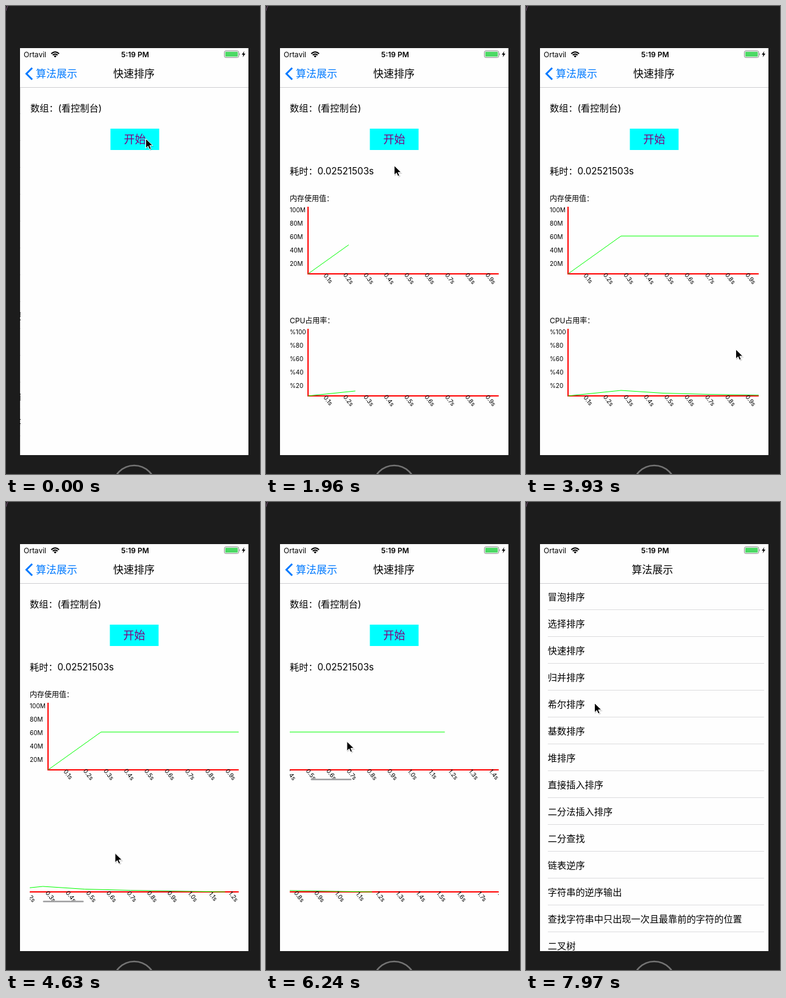
Animation of 417 by 767 pixels, one loop 8 s. Source, as an HTML page:

```html
<!DOCTYPE html>
<html lang="zh-CN">
<head>
<meta charset="utf-8">
<style>
  html, body { margin: 0; width: 100%; height: 100%; overflow: hidden; background: #1c1c1c; }
  svg { display: block; }
  text { font: 15.2px Inter, "Noto Sans CJK SC", "Noto Sans CJK", sans-serif; white-space: pre; }
  text.status, text.caption { font-size: 12px; }
  text.title { font-size: 17px; font-weight: 500; }
  text.tick { font-size: 10px; }
</style>
</head>
<body>
<svg id="stage" width="417" height="767" viewBox="0 0 417 767"></svg>
<script>
const LOOP = 8000;
const ROWS = ['冒泡排序', '选择排序', '快速排序', '归并排序', '希尔排序', '基数排序', '堆排序',
  '直接插入排序', '二分法插入排序', '二分查找', '链表逆序', '字符串的逆序输出',
  '查找字符串中只出现一次且最靠前的字符的位置', '二叉树'];

const text = (x, y, s, attrs = '') => `<text x="${x}" y="${y}" ${attrs}>${s}</text>`;
const rect = (x, y, w, h, fill, attrs = '') =>
  `<rect x="${x}" y="${y}" width="${w}" height="${h}" fill="${fill}" ${attrs}/>`;

function chart(id, top, caption, tickLabel, points) {
  let ticks = '';
  for (let i = 0; i < 5; i++)
    ticks += text(39, top + 28.5 + i * 22, tickLabel(100 - i * 20), 'class="tick"');
  for (let i = 1; i <= 50; i++) {
    const move = `translate(${102 + 33.35 * (i - 1)} ${top + 137.5}) rotate(52)`;
    ticks += text(0, 3.5, (i / 10).toFixed(1) + 's', `class="tick" text-anchor="middle" transform="${move}"`);
  }
  return `<svg x="39" y="${top}" width="343" height="148" viewBox="39 ${top} 343 148">
    <g id="${id}Body">
      ${text(39, top + 10.5, caption, 'class="caption"')}
      <path d="M69 ${top + 20}V${top + 130}H1795" fill="none" stroke="#f00" stroke-width="2"/>
      <path id="${id}Line" d="M${points}" pathLength="1" fill="none" stroke="#0f0"/>
      ${ticks}
    </g>
    ${rect(42, top + 144.5, 67, 2.5, '#a0a0a2', `id="${id}Bar" rx="1.25"`)}
  </svg>`;
}

const list = ROWS.map((name, i) =>
  text(38, 160.5 + 44 * i, name) + rect(38, 176 + 44 * i, 360, 1, '#dcdcde')).join('');

document.getElementById('stage').innerHTML = `
  <clipPath id="screen"><rect x="23" y="69" width="375" height="667"/></clipPath>
  ${rect(0, 0, 417, 767, '#1c1c1c')}
  <path d="M0 8Q1 3 3 0" fill="none" stroke="#6b4a6b" stroke-width="1.2"/>
  <circle cx="210.5" cy="788" r="35" fill="none" stroke="#747474" stroke-width="2.5"/>
  <g clip-path="url(#screen)">
    ${rect(23, 69, 375, 667, '#fefefe')}
    <g id="list">${list}${rect(23, 133, 375, 603, '#000', 'id="dim"')}</g>
    <g id="page">
      ${rect(23, 133, 375, 603, '#fefefe')}
      ${text(39, 172.5, '数组：(看控制台)')}
      ${rect(170.5, 201, 80, 35, '#0ff')}
      ${text(210.5, 225, '开始', 'text-anchor="middle" style="font-size:18px" fill="#800080"')}
      <g id="result">
        ${text(39, 275.5, '耗时：0.02521503s')}
        ${chart('mem', 309, '内存使用值：', v => v + 'M', '69 439L156 377H455')}
        ${chart('cpu', 509, 'CPU占用率：', v => '%' + v, '69 639L156 630L225 634.5L300 636.5L455 639')}
      </g>
    </g>
    ${rect(23, 69, 375, 64, '#fefefe')}
    ${rect(23, 133, 375, 1, '#cfcfd1')}
    <g id="back" fill="#007aff">
      <path d="M43 101.5L33.5 111L43 120.5" fill="none" stroke="#007aff" stroke-width="3"/>
      ${text(49, 117, '算法展示', 'id="backLabel" style="font-size:17px"')}
    </g>
    ${text(210, 117, '快速排序', 'id="pageTitle" class="title" text-anchor="middle"')}
    ${text(210, 117, '算法展示', 'id="listTitle" class="title" text-anchor="middle"')}
    ${text(29, 83.5, 'Ortavil', 'class="status"')}
    ${text(212, 83.5, '5:19 PM', 'class="status" text-anchor="middle" style="font-weight:600"')}
    <path d="M74.3 78.2Q80.7 72.2 87.1 78.2M76.7 80.6Q80.7 76.9 84.7 80.6"
      fill="none" stroke="#000" stroke-width="2"/>
    <path d="M78.4 82Q80.7 80 83 82L80.7 84.4Z"/>
    ${rect(358.5, 73.5, 23.5, 11, 'none', 'rx="2.5" stroke="#8a8a8a"')}
    ${rect(360, 75, 20.5, 8, '#4cd964', 'rx="1"')}
    <path d="M383.2 77Q385.2 79 383.2 81Z" fill="#8a8a8a"/>
    <path d="M391.3 74L387 79.8H389.6L388.6 84L393 78.1H390.3Z"/>
  </g>
  <g id="cursor">
    <path d="M1 2V18L5 15L8 20L11 18L9 14H14Z" fill="#000" opacity=".15"/>
    <path d="M.5 .5V16L4.2 12.6L6.6 18L9.2 16.9L6.9 11.7H12Z" stroke="#fff"/>
  </g>`;

const el = id => document.getElementById(id);
const shift = (id, x, y = 0) => el(id).setAttribute('transform', `translate(${x} ${y})`);
const fade = (id, opacity) => el(id).setAttribute('opacity', opacity);

const ramp = (t, start, end) => Math.min(1, Math.max(0, (t - start) / (end - start)));
const easeOut = (t, start, end) => 1 - (1 - ramp(t, start, end)) ** 2;
const visible = (t, start, end) => ramp(t, start, start + 50) - ramp(t, end, end + 250);

// Each gesture glides from wherever the cursor rests: [start, end, x, y]
const GESTURES = [
  [50, 230, 217, 220], [590, 700, 215, 243], [1410, 1960, 210, 261],
  [2190, 2550, 127, 410], [2550, 3300, 344, 562], [3930, 4220, 336, 590],
  [4400, 4930, 105, 568], [5150, 5350, 50, 568], [5350, 5720, 250, 412],
  [5960, 6560, 86, 384], [6770, 7060, 115, 150], [7300, 7430, 73, 104], [7550, 7970, 112, 329]
];

function cursorAt(t) {
  let x = 229, y = 217;
  for (const [start, end, toX, toY] of GESTURES) {
    const u = easeOut(t, start, end);
    x += (toX - x) * u;
    y += (toY - y) * u;
  }
  return [x, y];
}

// Critically damped settle used by the page transition
function settle(t) {
  const s = Math.max(0, t - 7550) * 0.014;
  return 1 - (1 + s) * Math.exp(-s);
}

function drawChart(id, drawn, offset, bar) {
  el(id + 'Line').setAttribute('stroke-dasharray', `${drawn} 2`);
  shift(id + 'Body', -offset);
  shift(id + 'Bar', offset * 0.195);
  fade(id + 'Bar', bar);
}

function draw(t) {
  const pop = settle(t);
  const gone = (1 - pop) ** 2;
  shift('page', 1 - ramp(t, 50, 200) + 375 * pop);
  shift('list', -112 * (1 - pop));
  fade('dim', 0.1 * (1 - pop));

  shift('backLabel', 127 * pop);
  fade('back', gone);
  shift('pageTitle', 150 * pop);
  fade('pageTitle', gone);
  shift('listTitle', -127 * (1 - pop));
  fade('listTitle', pop);

  el('result').style.display = t < 1410 ? 'none' : '';
  const drawn = ramp(t, 1375, 4275);
  drawChart('mem', drawn, 225 * easeOut(t, 5960, 6560), visible(t, 5960, 6800));
  drawChart('cpu', drawn, 140 * easeOut(t, 4400, 4930) + 141 * easeOut(t, 5150, 5500),
    visible(t, 4400, 5480));
  shift('cursor', ...cursorAt(t));
}

function tick() {
  draw(performance.now() % LOOP);
  requestAnimationFrame(tick);
}
tick();
</script>
</body>
</html>
```
